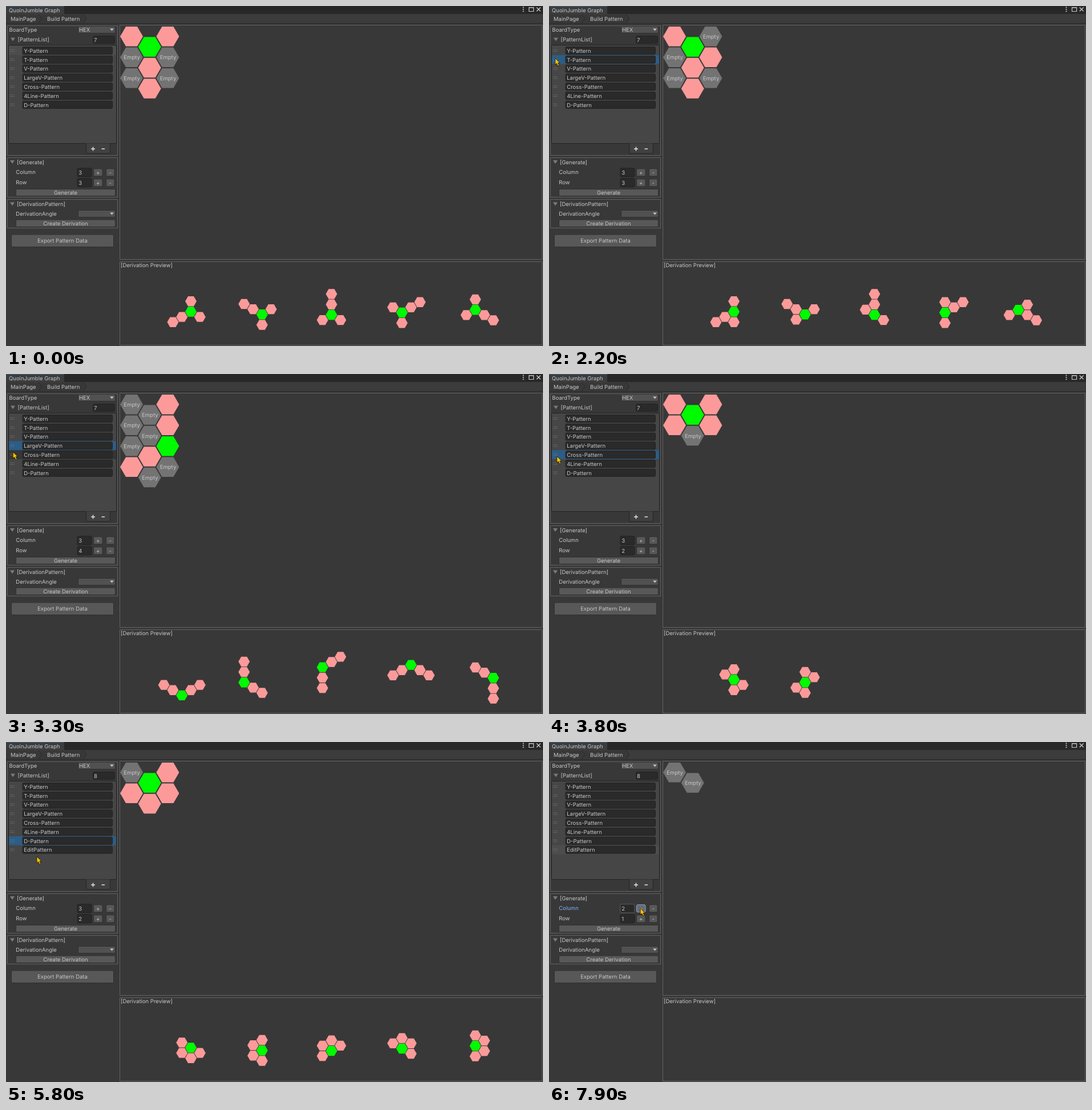
These frames come from a looping animation (941x595 px, 8 s). An HTML page:

```html
<!DOCTYPE html>
<html lang="en">
<head>
<meta charset="utf-8">
<title>Pattern builder</title>
<style>
html, body { margin: 0; width: 100%; height: 100%; overflow: hidden; background: #383838; }
svg { display: block; width: 941px; height: 595px; }
text { font: 9.5px Inter, Roboto, sans-serif; fill: #c8c8c8; white-space: pre; text-rendering: geometricPrecision; }
</style>
</head>
<body>
<svg id="stage" viewBox="0 0 941 595">
  <g id="frame"></g><g id="list"></g><g id="fields"></g><g id="board"></g><g id="preview"></g>
  <path id="cursor" d="M0 0V11.2L2.6 9L4.9 13.4L7 12.4L4.9 8.2H8.3Z" fill="#ffc400" stroke="#111" stroke-width=".8" stroke-linejoin="round"/>
</svg>
<script>
const LOOP = 8000, TICK = 100, ROW_H = 15.8, LIST_Y = 70.1;
const $ = id => document.getElementById(id);

// Each string is one column, top to bottom: P part, G pivot, . empty
const PATTERNS = [
  { name: 'Y-Pattern', cols: ['P..', 'GPP', 'P..'], turns: 5 },
  { name: 'T-Pattern', cols: ['P..', 'GPP', '.P.'], turns: 5 },
  { name: 'V-Pattern', cols: ['P.P', 'PP.', '.G.'], turns: 5 },
  { name: 'LargeV-Pattern', cols: ['...P', '..P.', 'PPG.'], turns: 5 },
  { name: 'Cross-Pattern', cols: ['PP', 'G.', 'PP'], turns: 2 },
  { name: '4Line-Pattern', cols: ['P', 'G', 'P', 'P'], turns: 2 },
  { name: 'D-Pattern', cols: ['.P', 'GP', 'PP'], turns: 5 },
  { name: 'EditPattern', cols: ['.'], turns: 0 }
];
const FILL = { P: '#fc9a9a', G: '#00fa00', '.': '#737373' };

// When each row of the list is clicked, from the top
const CLICKS = [1000, 2100, 2600, 3100, 3800, 4100, 4500, 6000];
const ADD = 5500, PRESS = 7700, WIDEN = 7800;

// Cursor stops: arrival time, x, y
const STOPS = [
  [100, 760, 130], [900, 13.5, 82], [1600, 11, 90], [2400, 9, 107], [2800, 9, 125], [3400, 14, 143],
  [4000, 12, 158], [4300, 12, 168], [5300, 153, 246], [6000, 16, 183], [6600, 17, 197],
  [6900, 238, 305], [7500, 160, 291]
];

const rect = (x, y, w, h, fill, stroke = 'none', r = 0) =>
  `<rect x="${x}" y="${y}" width="${w}" height="${h}" rx="${r}" fill="${fill}" stroke="${stroke}"/>`;
const text = (x, y, s, extra = '') => `<text x="${x}" y="${y}" ${extra}>${s}</text>`;
const mid = (x, y, s) => text(x, y, s, 'text-anchor="middle"');
const path = (d, fill, stroke = 'none', w = 1) =>
  `<path d="${d}" fill="${fill}" stroke="${stroke}" stroke-width="${w}"/>`;
const panel = (x, y, w, h) => rect(x + .5, y + .5, w - 1, h - 1, 'none', '#626262');
const field = (x, y, w, h, edge = '#222') => rect(x + .5, y + .5, w - 1, h - 1, '#2a2a2a', edge, 2);
const button = (x, y, w, h, s, hot) =>
  rect(x + .5, y + .5, w - 1, h - 1, hot ? '#686b72' : '#585858', hot ? '#8ea6cf' : '#303030', 2) +
  mid(x + w / 2, y + h / 2 + 3.5, s);
const fold = (x, y) => path(`M${x - 4} ${y - 3}h8l-4 6z`, '#7b7b7b');
const dropdown = (x, y, w, h, s) =>
  rect(x + .5, y + .5, w - 1, h - 1, '#515151', '#303030', 2) + text(x + 2, y + 10, s) +
  path(`M${x + w - 10} ${y + 4.5}h7l-3.5 4z`, '#c4c4c4');

function hex(x, y, r, fill) {
  const h = r * Math.sqrt(3) / 2;
  return path(`M${x - r} ${y}l${r / 2} ${-h}h${r}l${r / 2} ${h}l${-r / 2} ${h}h${-r}z`, fill);
}

function eachCell(cols, fn) {
  cols.forEach((col, c) => [...col].forEach((kind, r) => fn(kind, c, r + (c % 2) / 2)));
}

function drawFrame() {
  const crumb = x => path(`M0 15H${x}l5.5 7l-5.5 7.5H0z`, '#383838') +
    path(`M${x} 15l5.5 7l-5.5 7.5`, 'none', '#2a2a2a');
  $('frame').innerHTML =
    rect(0, 0, 941, 595, '#383838') + rect(0, 0, 941, 14, '#282828') +
    rect(0, 0, 102, 14, '#3c3c3c') + rect(0, 0, 102, 1, '#2c5d87') +
    rect(0, 14, 941, 16, '#3c3c3c') + rect(0, 30, 941, 1, '#2a2a2a') +
    crumb(135.5) + crumb(57.5) +
    text(5, 11, 'QuoinJumble Graph') + text(8, 25.5, 'MainPage') + text(72, 25.5, 'Build Pattern') +
    [0, 1, 2].map(i => `<circle cx="906.5" cy="${2.3 + 3.5 * i}" r="1.1" fill="#c4c4c4"/>`).join('') +
    path('M916.5 2.5h8v7h-8zM916 3h9', 'none', '#c4c4c4', 1.2) +
    path('M929.8 2.5l6.8 6.8M936.6 2.5l-6.8 6.8', 'none', '#c4c4c4', 1.4) +
    panel(2, 34, 194, 228) + panel(2, 265, 194, 70) + panel(2, 338, 194, 51) +
    panel(199, 33, 741, 411) + panel(199, 447, 741, 147) +
    text(5.5, 45, 'BoardType') + dropdown(126, 35, 66, 13, 'HEX') +
    fold(12, 58.5) + text(20.5, 62, '[PatternList]') +
    rect(4.5, 68.5, 189, 172, '#464646', '#242424', 2) +
    path('M140.5 240.5V256q0 2 2 2H180.5q2 0 2 -2V240.5', '#414141', '#242424') +
    path('M149 250h7M152.5 246.5v7M167.5 250h5.5', 'none', '#e4e4e4', 1.5) +
    fold(11, 273) + text(19, 276.6, '[Generate]') +
    button(17, 320, 175, 13, 'Generate') +
    fold(11, 346.5) + text(19, 350, '[DerivationPattern]') +
    text(17.3, 367, 'DerivationAngle') + dropdown(126, 357, 66, 13, '') +
    button(17, 373.5, 175, 13.5, 'Create Derivation') +
    button(9, 399.5, 180, 22.5, 'Export Pattern Data') +
    text(201, 457.2, '[Derivation Preview]');
}

function drawList(rows, sel, focus, hover) {
  let out = field(152, 52, 39, 14) + text(154, 63.2, rows);
  for (let i = 0; i < rows; i++) {
    const y = LIST_Y + i * ROW_H, c = y + ROW_H / 2, lit = i === sel && focus;
    const bg = lit ? '#2c5d87' : i === sel ? '#4d4d4d' : i === hover ? '#363636' : '#464646';
    out += rect(5, y, 188, ROW_H, bg) +
      path(`M7 ${c - 1.5}h8M7 ${c + 1.5}h8`, 'none', lit ? '#51718c' : '#636363') +
      field(28.5, c - 7, 158.5, 14) + text(31.2, c + 3.8, PATTERNS[i].name);
  }
  $('list').innerHTML = out;
}

function drawFields(cols, hot) {
  const line = (y, label, n, hot) =>
    text(17.3, y + 3.2, label, hot ? 'style="fill:#7fb2fa"' : '') +
    field(124.5, y - 7, 26, 16, hot ? '#5c5c5c' : '#222') + text(127.3, y + 4.2, n) +
    button(153, y - 6, 16.5, 14, '+', hot) + button(175, y - 6, 15.5, 14, '-');
  $('fields').innerHTML = line(290.3, 'Column', cols.length, hot) + line(308.3, 'Row', cols[0].length);
}

function drawBoard(cols) {
  let out = '';
  eachCell(cols, (kind, c, r) => {
    const x = 220 + c * 31.7, y = 53.2 + r * 36.5;
    out += hex(x, y, 20, FILL[kind]);
    if (kind === '.') out += mid(x + .6, y + 3.7, 'Empty');
  });
  $('board').innerHTML = out;
}

// Preview k is the pattern turned by k * 60 degrees about a point near column 1
function drawPreview({ cols, turns }) {
  let out = '';
  for (let k = 1; k <= turns; k++) {
    const a = k * Math.PI / 3, cos = Math.cos(a), sin = Math.sin(a);
    eachCell(cols, (kind, c, r) => {
      if (kind === '.') return;
      const dx = (c - 1) * 15.8 + 1.9, dy = (r - .5) * 18.24 - 4.75;
      out += hex(192.3 + 126.65 * k + dx * cos - dy * sin, 535.75 + dx * sin + dy * cos, 10, FILL[kind]);
    });
  }
  $('preview').innerHTML = out;
}

// Longer trips take longer; each one ends exactly at its stop
function cursorAt(t) {
  if (t <= STOPS[0][0]) return null;
  const i = STOPS.findIndex(s => s[0] > t);
  if (i < 0) return STOPS.at(-1).slice(1);
  const [t0, x0, y0] = STOPS[i - 1], [t1, x1, y1] = STOPS[i];
  const trip = Math.min(800, 200 + 2.5 * Math.hypot(x1 - x0, y1 - y0));
  const leave = Math.max(t0, t1 - trip);
  const f = Math.max(0, (t - leave) / (t1 - leave)), e = f * f * (3 - 2 * f);
  return [x0 + (x1 - x0) * e, y0 + (y1 - y0) * e];
}

function draw(t) {
  const sel = Math.max(0, CLICKS.filter(c => c <= t).length - 1);
  const pattern = PATTERNS[sel], cols = t >= WIDEN ? ['.', '.'] : pattern.cols;
  const tip = cursorAt(t);
  const hover = tip && tip[0] < 193 ? Math.floor((tip[1] - LIST_Y) / ROW_H) : -1;
  drawList(t >= ADD ? 8 : 7, sel, t >= CLICKS[0] && t < PRESS, hover);
  drawFields(cols, t >= PRESS);
  drawBoard(cols);
  drawPreview(pattern);
  $('cursor').setAttribute('visibility', tip ? 'visible' : 'hidden');
  if (tip) $('cursor').setAttribute('transform', `translate(${tip})`);
}

let last = -1;
const start = performance.now();
function loop() {
  const t = Math.floor((performance.now() - start) % LOOP / TICK) * TICK;
  if (t !== last) draw(last = t);
  requestAnimationFrame(loop);
}
drawFrame();
loop();
</script>
</body>
</html>
```
